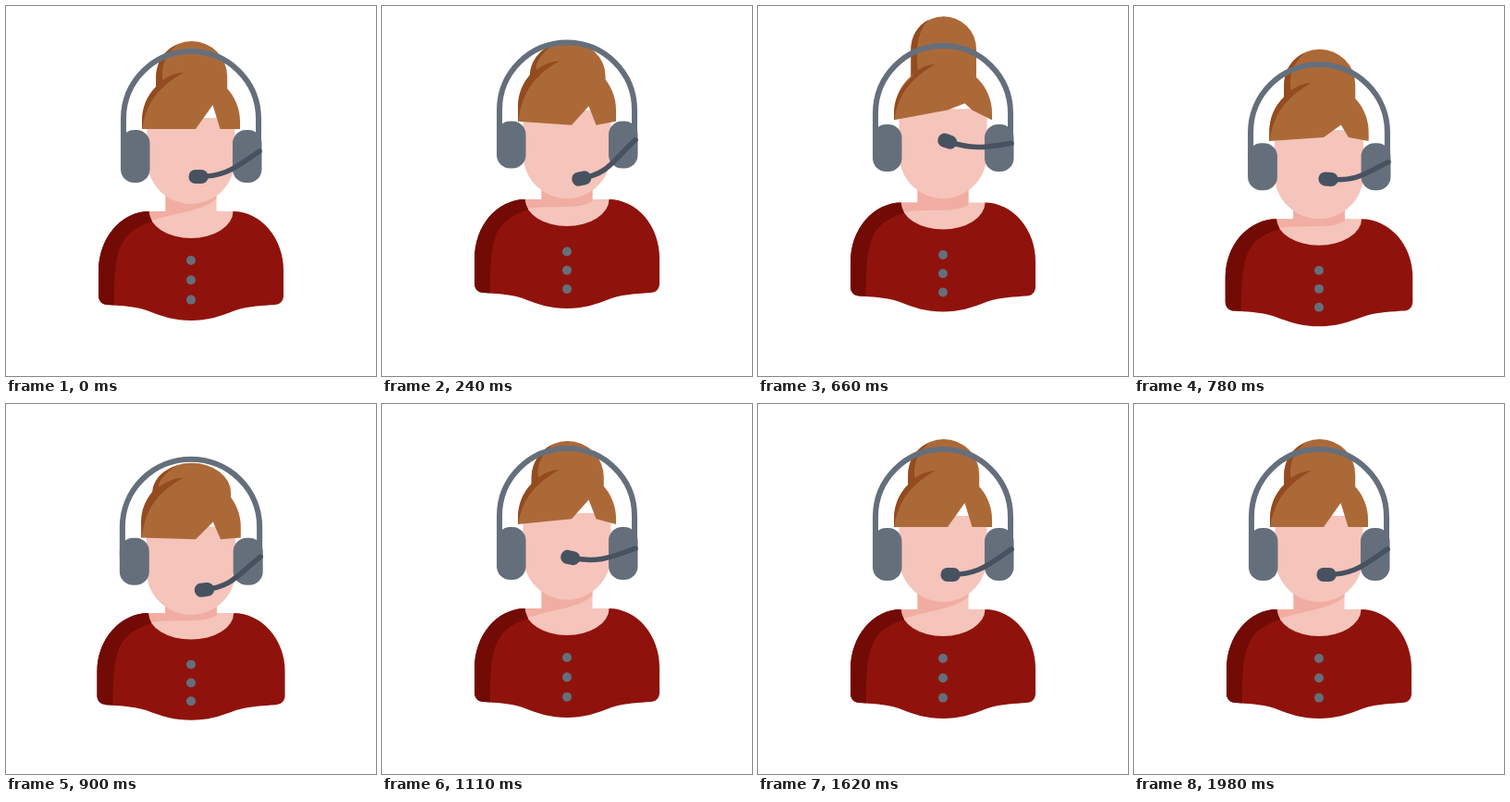
An HTML page that plays this animation: 400x400 px, repeating every 4040 ms.

```html
<!DOCTYPE html>
<html lang="en">
<head>
<meta charset="utf-8">
<title>Headset agent</title>
<style>
  html, body { margin: 0; width: 100%; height: 100%; overflow: hidden; background: #fff; }
  svg { display: block; width: 100%; height: 100%; }
</style>
</head>
<body>
<svg id="stage" viewBox="0 0 400 400"></svg>
<script>
const LOOP = 4040, STEP = 30, REST_AT = 1620;
const DIP = 8, APEX = 440, HEIGHT = 30, AIR_TIME = 300;

const SKIN = '#f5c4bb', SKIN_SHADE = '#f1ada2', SHIRT = '#8f130c', SHIRT_SHADE = '#720b05',
  HAIR = '#ac6938', HAIR_SHADE = '#934b1f', GRAY = '#656f7b', MIC = '#475260';

function ease(u) {
  u = Math.min(1, Math.max(0, u));
  return u * u * (3 - 2 * u);
}

// Eased moves from one [time, value] point to the next.
const follow = (t, points) => points.reduce((value, [time, target], i) =>
  i ? value + (target - points[i - 1][1]) * ease((t - points[i - 1][0]) / (time - points[i - 1][0])) : target, 0);

// Crouch, ballistic jump, damped landing.
function lift(t) {
  const takeoff = APEX - AIR_TIME, landing = APEX + AIR_TIME;
  if (t < takeoff) return DIP * ease(t / takeoff);
  if (t < landing) return -HEIGHT + (HEIGHT + DIP) * ((t - APEX) / AIR_TIME) ** 2;
  const s = t - landing;
  return DIP * Math.exp(-s / 200) * Math.cos(2 * Math.PI * s / 960);
}

function poseAt(t) {
  if (t >= REST_AT) t = 0;
  const body = lift(t);
  const wide = 0.4 * Math.max(0, lift(Math.max(0, t - 60)));
  const squash = 6 * ease(t / 150) * (1 - ease((t - 930) / 180));
  const head = body + 0.6 * squash + 3.5 * wide;
  const swing = follow(t, [[0, 0], [240, 11.5], [640, -33], [900, 5.5], [1110, -17.5], [1300, 3], [1500, 0]]);
  const stretch = follow(t, [[0, 0], [100, -4], [240, 13], [680, -18], [900, 18], [1110, 3], [1300, 0]]);
  return { body, wide, squash, head, swing, stretch };
}

const path = (fill, d) => `<path fill="${fill}" d="${d}"/>`;
const line = (color, width, d) =>
  `<path fill="none" stroke="${color}" stroke-width="${width}" stroke-linecap="round" d="${d}"/>`;

function drawBody({ body, wide, squash }) {
  const top = body + 1.5 * wide;
  const scale = (118 + body - top) / 118;
  const buttons = [0, 1, 2].map(i =>
    `<circle cx="200" cy="${275 + 21.3 * i + squash * (0.6 - 0.18 * i)}" r="5" fill="${GRAY}"/>`);
  return `<g transform="translate(0 ${222 + top - 222 * scale}) scale(1 ${scale})">`
    + path(SKIN, 'M172.5 180H227.5V222H246V254H154V222H172.5Z')
    + path(SKIN_SHADE, `M154 222H172.5V180H227.5V${208 + 2.7 * squash}
        C212 ${222 + 2 * squash} 190 ${222 + squash} 157 232Z`)
    + path(SHIRT, `M154.5 222A45.5 29 0 0 0 245.5 222A55 64 0 0 1 300 286V313
        C300 319 296 323 290 323C278 324 264 324 248 329C230 336 218 340 200 340
        C182 340 170 336 152 329C136 324 122 324 110 323C104 323 100 319 100 313V286
        A55 64 0 0 1 154.5 222Z`)
    + path(SHIRT_SHADE, `M154.5 222Q155 227 158 233C122 245 117 262 117 323.5L110 323
        C104 323 100 319 100 313V286A55 64 0 0 1 154.5 222Z`)
    + buttons.join('') + '</g>';
}

function drawHead({ head, squash, swing, stretch }) {
  const edge = 133 + head + 0.12 * swing;
  const low = 133 + head + 0.45 * swing;
  const parting = 107 + head + 0.15 * swing + 1.5 * squash;
  const cheek = 166 + head + 0.08 * swing + 0.45 * squash;
  const crown = head - 0.5 * squash;
  const half = 38.5 + 0.18 * stretch, left = 200.7 - half, right = 200.7 + half;
  const base = 88 + crown, bunTop = 38 + crown + stretch;
  const rise = Math.min(half, base - bunTop), side = bunTop + rise;
  return path(SKIN, `M152.5 ${edge - 12}H247.5V${cheek}A47.5 48 0 0 1 152.5 ${cheek}Z`)
    + path(HAIR, `M${left} ${base + 12}V${side}A${half} ${rise} 0 0 1 ${right} ${side}V${base + 12}Z`)
    + path(HAIR_SHADE, `M${left} ${base + 4}V${side}
        A${half} ${rise} 0 0 1 185 ${bunTop + rise * 0.09}
        C${left + 9} ${bunTop + rise * 0.4} ${left + 4} ${side - rise * 0.2} ${left + 8} ${base - 6}Z`)
    + path(HAIR, `M147 ${edge}V${125 + crown}A53 53 0 0 1 253 ${125 + crown}V${edge}
        L231.5 ${low}L223.5 ${parting}L205 ${low}Z`)
    + path(HAIR_SHADE, `M147 ${edge}V${125 + crown}A53 53 0 0 1 ${left} ${base - 1}
        C172 ${77 + crown} 182 ${72 + crown} 192 ${72 + crown}
        C170 ${84 + crown} 151 ${102 + crown} 147.5 ${edge}Z`);
}

function drawHeadset({ head, squash, swing }) {
  const ear = x =>
    `<rect x="${x}" y="${134 + head}" width="31.5" height="${57 - squash}" rx="14.5" fill="${GRAY}"/>`;
  const x = 208 + 0.25 * swing + 0.8 * squash, y = 184.5 + head + swing;
  const endY = 157 + head - 0.45 * squash;
  const tilt = -0.7 * swing - 0.5 * squash, angle = tilt * Math.PI / 180;
  const bend = `${x + 30 * Math.cos(angle)} ${y + 30 * Math.sin(angle)}`;
  return line(GRAY, 6, `M127 ${154 + head}V${122 + head}A73 73 0 0 1 273 ${122 + head}V${154 + head}`)
    + ear(124) + ear(245)
    + line(MIC, 5.5, `M${x} ${y}C${bend} 248 ${endY + 0.45 * (y - endY) + 5} 274 ${endY}`)
    + `<rect x="-10.5" y="-7.5" width="21" height="15" rx="7.2" fill="${MIC}"
        transform="translate(${x} ${y}) rotate(${tilt})"/>`;
}

const stage = document.getElementById('stage');

function render(now) {
  const pose = poseAt(Math.floor(now % LOOP / STEP) * STEP);
  const widen = 1 + pose.wide / 100;
  stage.innerHTML = `<g transform="translate(${200 - 200 * widen} 0) scale(${widen} 1)">`
    + drawBody(pose) + drawHead(pose) + drawHeadset(pose) + '</g>';
}

const start = performance.now();
function tick() {
  render(performance.now() - start);
  requestAnimationFrame(tick);
}
tick();
</script>
</body>
</html>
```
